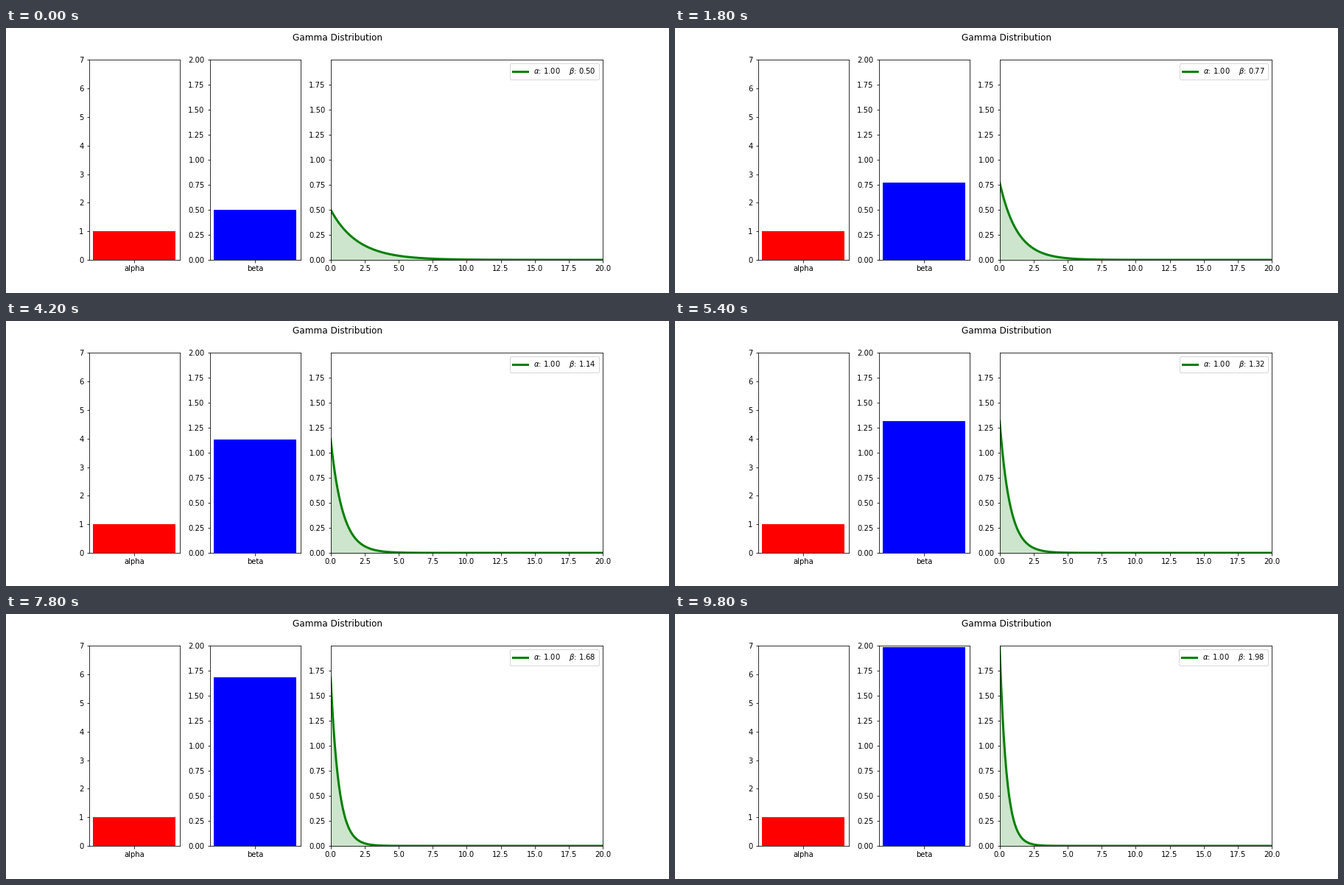
These frames come from a looping animation (900x360 px, 10000 ms). A matplotlib script:

```python
import math

import matplotlib.pyplot as plt
import numpy as np
from matplotlib.animation import FuncAnimation

FRAMES = 50
ALPHA = 1.0
BETAS = np.linspace(0.5, 2.0, 2 * FRAMES)[::2]
X = np.linspace(0, 20, 200)


def gamma_pdf(x, a, b):
    return b ** a * x ** (a - 1) * np.exp(-b * x) / math.gamma(a)


def label(a, b):
    return rf"$\alpha$: {a:.2f}    $\beta$: {b:.2f}"


def area(y):
    """Polygon between the curve and the x axis."""
    return np.column_stack([np.r_[X[0], X, X[-1]], np.r_[0, y, 0]])


def bar_panel(ax, name, value, color, top, step):
    bar = ax.bar([name], [value], color=color)[0]
    ax.set_ylim(0, top)
    ax.set_yticks(np.arange(0, top + step / 2, step))
    return bar


fig, (ax_a, ax_b, ax_pdf) = plt.subplots(
    1, 3, figsize=(12.5, 5), dpi=72,
    gridspec_kw=dict(width_ratios=[1, 1, 3], left=0.125, right=0.9,
                     bottom=0.125, top=0.88, wspace=0.2))
fig.suptitle("Gamma Distribution", fontsize=12)

bar_panel(ax_a, "alpha", ALPHA, "red", 7, 1)
beta_bar = bar_panel(ax_b, "beta", BETAS[0], "blue", 2, 0.25)

pdf = gamma_pdf(X, ALPHA, BETAS[0])
line, = ax_pdf.plot(X, pdf, color="green", lw=3, label=label(ALPHA, BETAS[0]))
fill = ax_pdf.fill_between(X, pdf, color="green", alpha=0.2)
ax_pdf.set_xlim(0, 20)
ax_pdf.set_xticks(np.arange(0, 20.1, 2.5))
ax_pdf.set_yticks(np.arange(0, 1.8, 0.25))
ax_pdf.set_ylim(0, 1.999)
legend = ax_pdf.legend(loc="upper right")


def update(i):
    b = BETAS[i]
    y = gamma_pdf(X, ALPHA, b)
    beta_bar.set_height(b)
    line.set_ydata(y)
    fill.set_verts([area(y)])
    legend.get_texts()[0].set_text(label(ALPHA, b))
    return beta_bar, line, fill, legend


anim = FuncAnimation(fig, update, frames=FRAMES, interval=200,
                     repeat=True, repeat_delay=0, blit=False)
plt.show()
```
